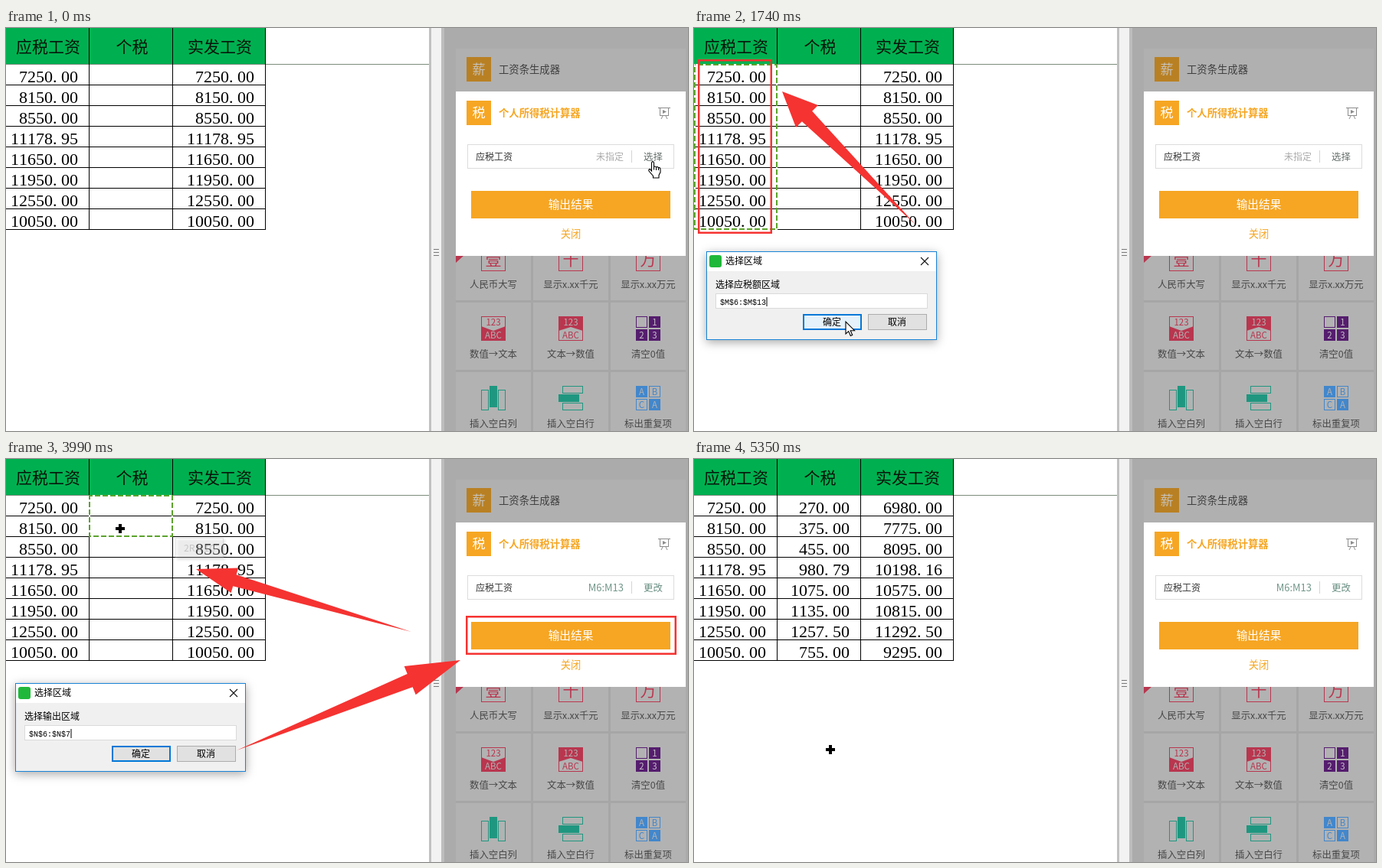
Write an HTML page with a canvas that moves like this. It is 890 px wide and 527 px high and loops after 5.68 s.

```html
<!DOCTYPE html>
<html lang="zh-CN">
<head>
<meta charset="utf-8">
<title>个人所得税计算器</title>
<style>
html, body { margin: 0; width: 100%; height: 100%; overflow: hidden; background: #fff; }
canvas { display: block; }
</style>
</head>
<body>
<canvas id="stage" width="890" height="527"></canvas>
<script>
const ctx = document.getElementById('stage').getContext('2d');
const LOOP = 5680;
const UI = '"Noto Sans CJK SC", "Noto Sans CJK", "Noto Sans", sans-serif';
const RED = '#f53331', ORANGE = '#f6a623', CARD = '#b2b2b2';
const PINK = '#b9364f', PURPLE = '#551d6e', TEAL = '#1f9780', BLUE = '#4287cc';

const SALARY = [7250, 8150, 8550, 11178.95, 11650, 11950, 12550, 10050];
const TAX = [270, 375, 455, 980.79, 1075, 1135, 1257.5, 755];

// Drag, then walk to the confirm button: [time, x, y]
const PICK_IN = [[640, 76, 62], [910, 76, 221], [1010, 78, 250], [1150, 78, 250], [1600, 198, 384]];
const PICK_OUT = [[3990, 149, 90], [4300, 149, 250], [4420, 149, 250], [4760, 178, 380]];

const clamp = (v, lo = 0, hi = 1) => Math.min(hi, Math.max(lo, v));
const between = (t, a, b) => t >= a && t < b;

function along(keys, t) {
  let a = keys[0];
  for (const b of keys) {
    if (t < b[0]) {
      const k = clamp((t - a[0]) / (b[0] - a[0] || 1));
      return [a[1] + (b[1] - a[1]) * k, a[2] + (b[2] - a[2]) * k];
    }
    a = b;
  }
  return [a[1], a[2]];
}

function fill(x, y, w, h, color) {
  ctx.fillStyle = color;
  ctx.fillRect(x, y, w, h);
}

function frame(x, y, w, h, color, line = 1) {
  ctx.strokeStyle = color;
  ctx.lineWidth = line;
  ctx.strokeRect(x + line / 2, y + line / 2, w - line, h - line);
}

function shape(points, color) {
  ctx.fillStyle = color;
  ctx.beginPath();
  points.forEach(p => ctx.lineTo(p[0], p[1]));
  ctx.closePath();
  ctx.fill();
}

function stroke(points, color, line = 1) {
  ctx.strokeStyle = color;
  ctx.lineWidth = line;
  ctx.beginPath();
  points.forEach((p, i) => i % 2 ? ctx.lineTo(...p) : ctx.moveTo(...p));
  ctx.stroke();
}

// y is the vertical middle of the glyphs
function label(str, x, y, size, color, align = 'left', weight = 400, family = UI) {
  ctx.font = `${weight} ${size}px ${family}`;
  ctx.textAlign = align;
  ctx.fillStyle = color;
  ctx.fillText(str, x, y + size * 0.37);
}

// Fixed-pitch figures ending at the right edge
function figure(value, right, y) {
  const str = value.toFixed(2);
  ctx.font = '22px "Liberation Serif", serif';
  ctx.textAlign = 'left';
  ctx.fillStyle = '#000';
  [...str].forEach((c, i) => ctx.fillText(c, right - 11 * (str.length - i), y));
}

function drawSheet(done) {
  fill(0, 0, 553, 527, '#fff');
  fill(0, 0, 338, 47, '#00b050');
  fill(0, 47, 552, 1, '#7b8c7b');
  for (const x of [108, 217, 338]) fill(x, 0, 1, 264, '#000');
  for (let i = 1; i <= 8; i++) fill(0, 47 + 27 * i, 339, 1, '#000');
  ['应税工资', '个税', '实发工资'].forEach((s, i) =>
    label(s, [55, 164.5, 279][i], 24.5, 21, '#06150b', 'center', 300));
  SALARY.forEach((pay, i) => {
    const y = 71 + 27 * i;
    figure(pay, 94, y);
    if (done) figure(TAX[i], 203, y);
    figure(done ? pay - TAX[i] : pay, 324, y);
  });
}

function drawSplitter() {
  fill(552, 0, 20, 527, '#f2f2f2');
  fill(552, 0, 3, 527, '#c1c1c1');
  fill(568, 0, 4, 527, '#bdbdbd');
  for (const y of [289, 293, 297]) fill(558, y, 7, 1, '#777');
}

function drawIcons() {
  ['壹', '千', '万'].forEach((s, i) => {
    const x = 620 + 101 * i;
    frame(x, 286, 32, 32, PINK);
    label(s, x + 16, 302, 21, PINK, 'center');
  });
  shape([[587, 298], [597, 298], [587, 307]], PINK);

  frame(620, 377, 32, 32, PINK);
  shape([[620, 390], [636, 396], [652, 390], [652, 409], [620, 409]], PINK);
  frame(721, 377, 32, 32, PINK);
  shape([[721, 377], [753, 377], [753, 396], [737, 391], [721, 396]], PINK);
  [636, 737].forEach((x, i) => {
    label('123', x, 385, 11.5, i ? CARD : PINK, 'center', 500);
    label('ABC', x, 401.5, 11.5, i ? PINK : CARD, 'center', 500);
  });

  for (let i = 0; i < 4; i++) {
    const x = 822 + 17 * (i % 2), row = 17 * (i >> 1);
    if (i) {
      fill(x, 377 + row, 15, 15, PURPLE);
      label(i, x + 7.5, 384.5 + row, 11.5, '#c4bcc8', 'center', 500);
    } else {
      frame(x, 377, 15, 15, PURPLE);
    }
    const solid = i === 0 || i === 3;
    if (solid) fill(x, 468 + row, 15, 15, BLUE);
    else frame(x, 468 + row, 15, 15, BLUE);
    label('ABCA'[i], x + 7.5, 475.5 + row, 11.5, solid ? CARD : BLUE, 'center');
  }

  frame(620, 473, 10, 27, TEAL);
  frame(642, 473, 10, 27, TEAL);
  fill(631, 468, 10, 28, TEAL);
  frame(726, 468, 27, 10, TEAL);
  frame(726, 490, 27, 10, TEAL);
  fill(721, 479, 27, 10, TEAL);
}

function drawPanel(chosen) {
  fill(572, 0, 318, 527, '#ababab');
  fill(587, 27, 300, 56, '#b0b0b0');
  fill(587, 298, 300, 229, '#a6a6a6');
  for (let i = 0; i < 9; i++) {
    fill(587 + 101 * (i % 3), 268 + 91 * Math.floor(i / 3), 98, 88, CARD);
  }
  drawIcons();
  ['人民币大写', '显示x.xx千元', '显示x.xx万元', '数值→文本', '文本→数值', '清空0值',
    '插入空白列', '插入空白行', '标出重复项'].forEach((s, i) =>
    label(s, 636 + 101 * (i % 3), 335 + 91 * Math.floor(i / 3), 12.4, '#474747', 'center'));

  fill(601, 38, 32, 32, '#b98023');
  label('薪', 617, 54, 17, '#c6c0b5', 'center');
  label('工资条生成器', 643, 54, 13.33, '#3f3f3f');

  fill(587, 83, 300, 215, '#fff');
  fill(601, 95, 32, 32, ORANGE);
  label('税', 617, 111, 17, '#fff', 'center');
  label('个人所得税计算器', 643, 111, 13.33, ORANGE, 'left', 700);

  const gray = '#8c8c8c';
  fill(851, 104, 16, 1, gray);
  frame(853, 104, 12, 11, gray);
  shape([[857, 107], [862, 109.5], [857, 112]], gray);
  stroke([[857, 115], [855, 119], [861, 115], [863, 119]], gray);

  frame(602, 152, 270, 32, '#dcdcdc');
  label('应税工资', 613, 168.5, 12, '#333');
  fill(816, 160, 1, 16, '#d4d4d4');
  label(chosen ? 'M6:M13' : '未指定', 806, 168.5, chosen ? 13 : 12, chosen ? '#6f9488' : '#aaa', 'right');
  label(chosen ? '更改' : '选择', 832, 168.5, 12.4, chosen ? '#668c80' : '#66706d');
  fill(607, 213, 260, 36, ORANGE);
  label('输出结果', 737, 231, 14.67, '#fff', 'center');
  label('关闭', 737, 269, 13.33, ORANGE, 'center');
}

function drawAnts(x, right, rows, t) {
  const h = 27 * rows;
  ctx.lineWidth = 2;
  ctx.strokeStyle = '#fff';
  ctx.strokeRect(x, 48, right - x, h - 1);
  ctx.save();
  ctx.strokeStyle = '#5ba32c';
  ctx.setLineDash([7, 3]);
  ctx.lineDashOffset = -Math.floor(t / 70);
  ctx.strokeRect(x, 48, right - x, h - 1);
  ctx.restore();
}

function shadowed(blur, dx, dy, alpha, draw) {
  ctx.save();
  ctx.shadowColor = `rgba(0,0,0,${alpha})`;
  ctx.shadowBlur = blur;
  ctx.shadowOffsetX = dx;
  ctx.shadowOffsetY = dy;
  draw();
  ctx.restore();
}

function drawTip(x, y, rows, alpha) {
  ctx.save();
  ctx.globalAlpha = alpha;
  shadowed(3, 2, 2, 0.4, () => fill(x, y, 63, 27, '#fff'));
  frame(x, y, 63, 27, '#909090');
  label(`${rows}R x 1C`, x + 31.5, y + 13.5, 12.4, '#5c5c5c', 'center');
  ctx.restore();
}

function drawDialog(x, y, prompt, range, hover, alpha) {
  ctx.save();
  ctx.globalAlpha = alpha;
  ctx.translate(x, y);
  shadowed(12, 0, 3, 0.35, () => fill(0, 0, 301, 116, '#f0f0f0'));
  fill(1, 1, 299, 25, '#fff');
  frame(0, 0, 301, 116, '#1883d7');
  ctx.fillStyle = '#20b83a';
  ctx.beginPath();
  ctx.roundRect(4, 5, 16, 16, 3);
  ctx.fill();
  label('选择区域', 25, 13, 12, '#000');
  stroke([[280, 8], [290, 18], [290, 8], [280, 18]], '#111', 1.1);
  label(prompt, 12, 43.5, 12, '#000');
  fill(12, 55, 277, 20, '#fff');
  frame(12, 55, 277, 20, '#dadada');
  label(range, 18, 66, 10, '#000', 'left', 400, '"Liberation Mono", monospace');
  fill(18.5 + 6 * range.length, 60, 1, 12, '#000');
  fill(126, 82, 77, 21, hover ? '#e5f1fb' : '#e1e1e1');
  frame(126, 82, 77, 21, '#0078d7', 2);
  fill(211, 82, 77, 21, '#e1e1e1');
  frame(211, 82, 77, 21, '#adadad');
  label('确定', 164, 92.5, 12, '#000', 'center');
  label('取消', 249, 92.5, 12, '#000', 'center');
  ctx.restore();
}

// Tapered arrow: head length, half width of head
function drawArrow(x, y, tailX, tailY, head, half) {
  const len = Math.hypot(tailX - x, tailY - y);
  ctx.save();
  ctx.translate(x, y);
  ctx.rotate(Math.atan2(tailY - y, tailX - x));
  shape([[0, 0], [head, -half], [head, -half * 0.46], [len, 0],
    [head, half * 0.46], [head, half]], RED);
  ctx.restore();
}

function drawPlus(x, y) {
  x = Math.round(x);
  y = Math.round(y);
  fill(x - 7, y - 3, 14, 6, '#fff');
  fill(x - 3, y - 7, 6, 14, '#fff');
  fill(x - 6, y - 2, 12, 4, '#000');
  fill(x - 2, y - 6, 4, 12, '#000');
}

function drawCursor(path, x, y, ink) {
  ctx.save();
  ctx.translate(x, y);
  const p = new Path2D(path);
  ctx.fillStyle = '#fff';
  ctx.fill(p);
  ctx.strokeStyle = ink;
  ctx.lineWidth = 1.1;
  ctx.stroke(p);
  ctx.restore();
}

const POINTER = 'M0 0V16L3.7 12.6L6.3 18.5L8.7 17.5L6.2 11.7H11.5Z';
const HAND = 'M4.5 2Q6 -.8 7.5 2V7.5Q9.2 6.2 10.5 8Q12.2 6.8 13.5 8.8Q15.5 8 16 10.5V14.5' +
  'L14 18.5V22H6.5V19.5L1 13Q.2 10.5 2.5 10.6L4.5 13ZM7.5 7.5V11.5M10.5 8V12M13.5 9V12';

// One range-picking session: selection, tooltip, dialog and its cursor
function drawPicker(t, s) {
  const [x, y] = along(s.keys, t);
  const rows = clamp(Math.floor((y - 48) / 27) + 1, 1, 8);
  const started = t >= s.keys[0][0];
  const open = t < s.shut;
  if (started && open) drawAnts(s.left, s.right, rows, t);
  if (started && t < s.drop) {
    drawTip(s.right + 4, 49 + 27 * rows, rows, clamp(s.tip + (t - s.keys[0][0]) / 200));
  }
  const alpha = clamp(1 - (t - s.shut) / 160);
  const end = started ? 6 + rows : 6;
  const col = s.col;
  if (alpha > 0) {
    drawDialog(s.x, s.y, s.prompt, `$${col}$6:$${col}$${end - 1}`, t >= s.hover, alpha);
  }
  return () => {
    if (!started) return;
    if (open && y > s.y) drawCursor(POINTER, x, y, '#000');
    else drawPlus(x, y);
  };
}

const FIRST = { keys: PICK_IN, left: 1, right: 108, drop: 1150, hover: 1740, shut: 2120, tip: 0,
  x: 16, y: 292, col: 'M', prompt: '选择应税额区域' };
const SECOND = { keys: PICK_OUT, left: 109, right: 217, drop: 4420, hover: 4760, shut: 5000, tip: 0.25,
  x: 12, y: 293, col: 'N', prompt: '选择输出区域' };

function draw(t) {
  drawSheet(t >= 5210);
  drawSplitter();
  drawPanel(t >= 2790);

  let cursor = () => {};
  if (between(t, 570, 2790)) cursor = drawPicker(t, FIRST);
  else if (t >= 3990) cursor = drawPicker(t, SECOND);
  else if (t < 570) cursor = () => drawCursor(HAND, 838, 174, '#000');
  else if (t >= 2860) cursor = () => drawCursor(HAND, 750.5, 233.5, '#157a3a');
  cursor();

  if (between(t, 570, 2790)) {
    frame(5, 41, 97, 228, RED, 2.5);
    drawArrow(115, 83, 289, 257, 46, 20.5);
  }
  if (between(t, 2860, 4060)) {
    frame(600, 205, 275, 51, RED, 2.5);
    drawArrow(593, 263, 301, 381, 71, 20);
  }
  if (between(t, 3990, 5140)) drawArrow(248, 144, 529, 226, 52.5, 17);
}

const start = performance.now();
function tick() {
  draw((performance.now() - start) % LOOP);
  requestAnimationFrame(tick);
}
tick();
</script>
</body>
</html>
```
